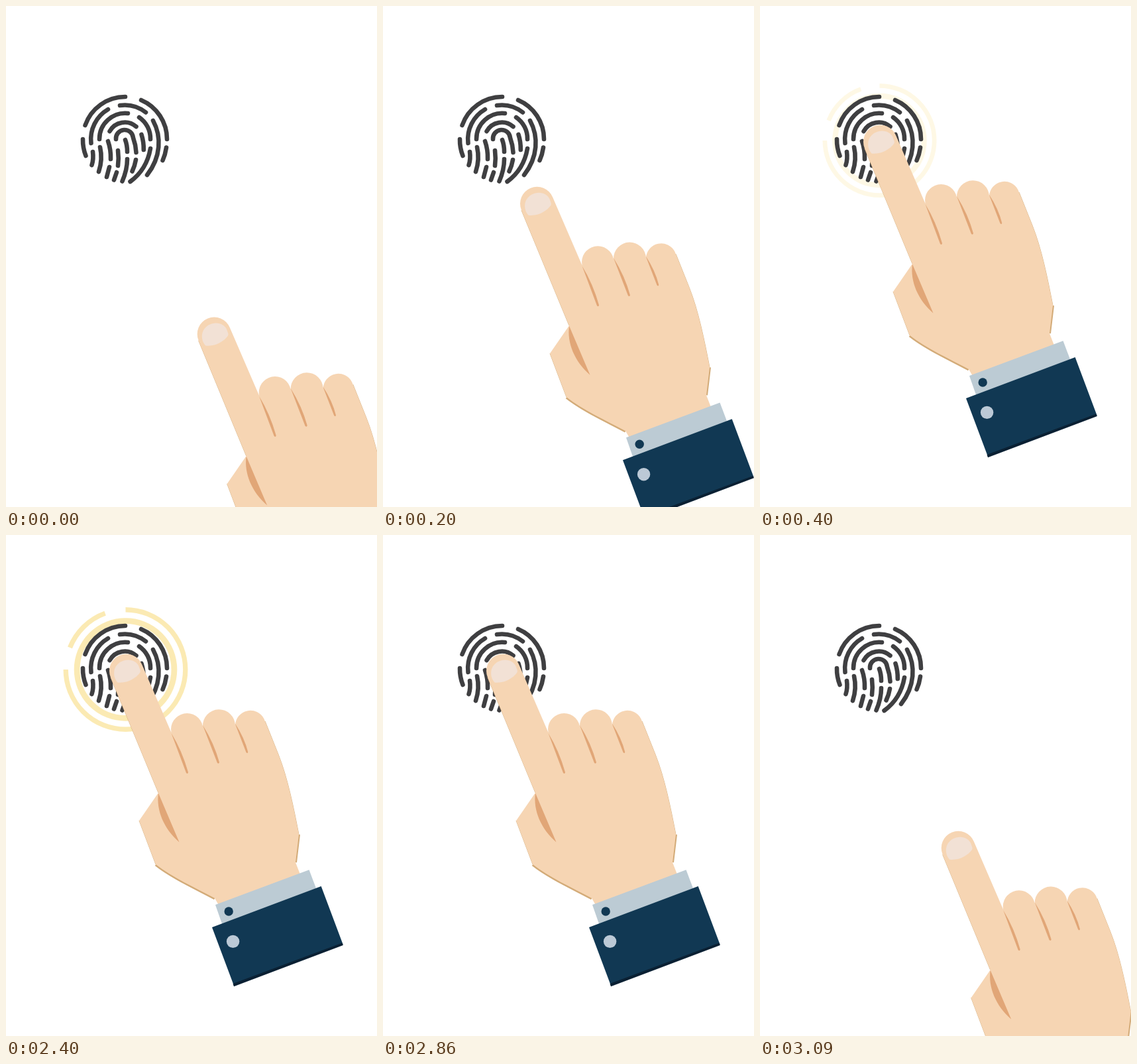
Animation, 560 px wide and 756 px high, one loop 3.19 s. Source, as an HTML page with a canvas:

```html
<!DOCTYPE html>
<html lang="en">
<head>
<meta charset="utf-8">
<title>Fingerprint touch</title>
<style>
html, body { margin: 0; width: 100%; height: 100%; overflow: hidden; background: #fff; }
canvas { display: block; width: 560px; height: 756px; }
</style>
</head>
<body>
<canvas id="stage"></canvas>
<script>
const W = 560, H = 756, LOOP = 3190;
const canvas = document.getElementById('stage');
const ctx = canvas.getContext('2d');
const dpr = window.devicePixelRatio || 1;
canvas.width = W * dpr;
canvas.height = H * dpr;

const SKIN = '#f6d5b3', CREASE = '#e1a677', EDGE = '#d3ab78';
const NAVY = '#113853', SHADE = '#0a2033', CUFF = '#bccbd4';
const INK = '#3f3f41', GOLD = '#f6cf52';

// Stepped poses: start time, hand offset, ring scale, ring opacity
const POSES = [
  { at: 0, x: 132.7, y: 290 },
  { at: 100, x: 95, y: 200 },
  { at: 200, x: 51, y: 93.3 },
  { at: 300, x: 9, y: 16 },
  { at: 400, x: 0, y: 0, size: 0.672, alpha: 0.15 },
  { at: 2400, x: 0, y: 0, size: 0.734, alpha: 0.44 },
  { at: 2520, x: 0, y: 0, size: 0.86, alpha: 0.73 },
  { at: 2640, x: 0, y: 0, size: 1, alpha: 1 },
  { at: 2760, x: 0, y: 0, size: 1, alpha: 0.5 },
  { at: 2860, x: 0, y: 0 },
  { at: 2990, x: 57, y: 122 },
  { at: 3090, x: 117.7, y: 267.3 }
];

const ridges = new Path2D(`
  M119.5 180A64 64 0 0 1 180 137 M204 142A64 64 0 0 1 243 201
  M116 201A64 64 0 0 0 120.5 226 M242 213.5Q240.5 224 236.5 233
  M128.5 207A52 52 0 0 1 154 156 M172 150A52 52 0 0 1 211 160.5
  M222 173C235 197 234 228 213 255
  M141 201A39 39 0 0 1 184 162 M201 168A39 39 0 0 1 218 201
  M218 215C214 238 204 253 187.5 265
  M156.5 189A26 26 0 0 1 196.5 182 M204.5 194Q208 205 207.8 217
  M166 201A13 13 0 0 1 192 199Q196 210 196.5 221
  M180 202Q183 210 183 220 M154 204Q158.5 217 158 231
  M169 218Q170.5 230 169 241 M142 213C145 226 144 238 140 250
  M131 220Q132.5 231 129.5 240 M156 243L152 258 M167 251L163 262.5
  M183 231C183 243 180 254 175.5 264.5 M196 232Q194.5 241 190.5 249.5`);

const hand = new Path2D(`M157.9 214.7A25.5 25.5 0 0 1 205.1 195.3L249.5 298
  A24 24 0 0 1 297 288.5A24 24 0 0 1 346 287A23 23 0 0 1 389.5 277.5
  L411 331C425 366 434 411 442 452L437 494L444 512L322 560L315 548
  C285 532 250 516 226 497L201 431L230 389Z`);
const handEdge = new Path2D(`M226 497.5C250 516.5 285 532.5 315 548.5
  M442 452L437 494`);
const sideEdge = new Path2D('M391 281L411 331C425 366 434 411 442 452M201 431L226 497M158 215L230 389');
const creases = new Path2D(`
  M249.5 299L272 359Q274.5 361.5 275 358Q266 326 249.5 299Z
  M297 287L319 344Q321.5 346 322 343Q314 314 297 287Z
  M345.5 284L362.5 328Q364.5 330.5 365.3 327.5Q360 306 345.5 284Z
  M230 389.5L261.5 463.5C238 443 226.5 415 230 389.5Z`);
const nail = new Path2D(`M168.5 222.5C161 214 160.5 199 173 191.5
  C185 185 197 190 200.5 198C202 203 204 205 202 208C196 216 184 224 168.5 222.5Z`);
const cuff = new Path2D('M316 558L457.5 505.3L468 533L326.5 588Z');
const sleeve = new Path2D('M311 592L475.7 530L508.7 618L344 680Z');
const hem = new Path2D('M342.6 677L507.4 615.6L508.8 619L344 681.3Z');

function fill(path, color) {
  ctx.fillStyle = color;
  ctx.fill(path);
}

function stroke(path, color, width) {
  ctx.strokeStyle = color;
  ctx.lineWidth = width;
  ctx.stroke(path);
}

function dot(x, y, r, color) {
  const p = new Path2D();
  p.arc(x, y, r, 0, Math.PI * 2);
  fill(p, color);
}

function arc(r, from, to, width) {
  const p = new Path2D();
  p.arc(0, 0, r, from * Math.PI / 180, to * Math.PI / 180);
  stroke(p, GOLD, width);
}

function drawRings(size, alpha) {
  ctx.save();
  ctx.translate(180.5, 203);
  ctx.scale(size, size);
  ctx.globalAlpha = alpha;
  ctx.lineCap = 'butt';
  arc(100, 0, 360, 12);
  arc(123, -90, 180, 10);
  arc(123, 201.5, 250, 10);
  ctx.restore();
}

function drawHand(x, y) {
  ctx.save();
  ctx.translate(x, y);
  ctx.lineCap = 'butt';
  stroke(handEdge, EDGE, 4);
  stroke(sideEdge, EDGE, 0.9);
  fill(hand, SKIN);
  fill(creases, CREASE);
  fill(nail, '#f2e1d5');
  fill(cuff, CUFF);
  dot(336.2, 568, 6.7, NAVY);
  fill(sleeve, NAVY);
  fill(hem, SHADE);
  dot(342.6, 613.4, 9.7, '#bcc9d6');
  ctx.restore();
}

function draw(time) {
  const pose = POSES.findLast(p => p.at <= time);
  ctx.setTransform(dpr, 0, 0, dpr, 0, 0);
  ctx.fillStyle = '#fff';
  ctx.fillRect(0, 0, W, H);
  if (pose.alpha) drawRings(pose.size, pose.alpha);
  ctx.lineCap = 'round';
  stroke(ridges, INK, 6.6);
  drawHand(pose.x, pose.y);
}

const start = performance.now();
function tick() {
  draw((performance.now() - start) % LOOP);
  requestAnimationFrame(tick);
}
tick();
</script>
</body>
</html>
```
